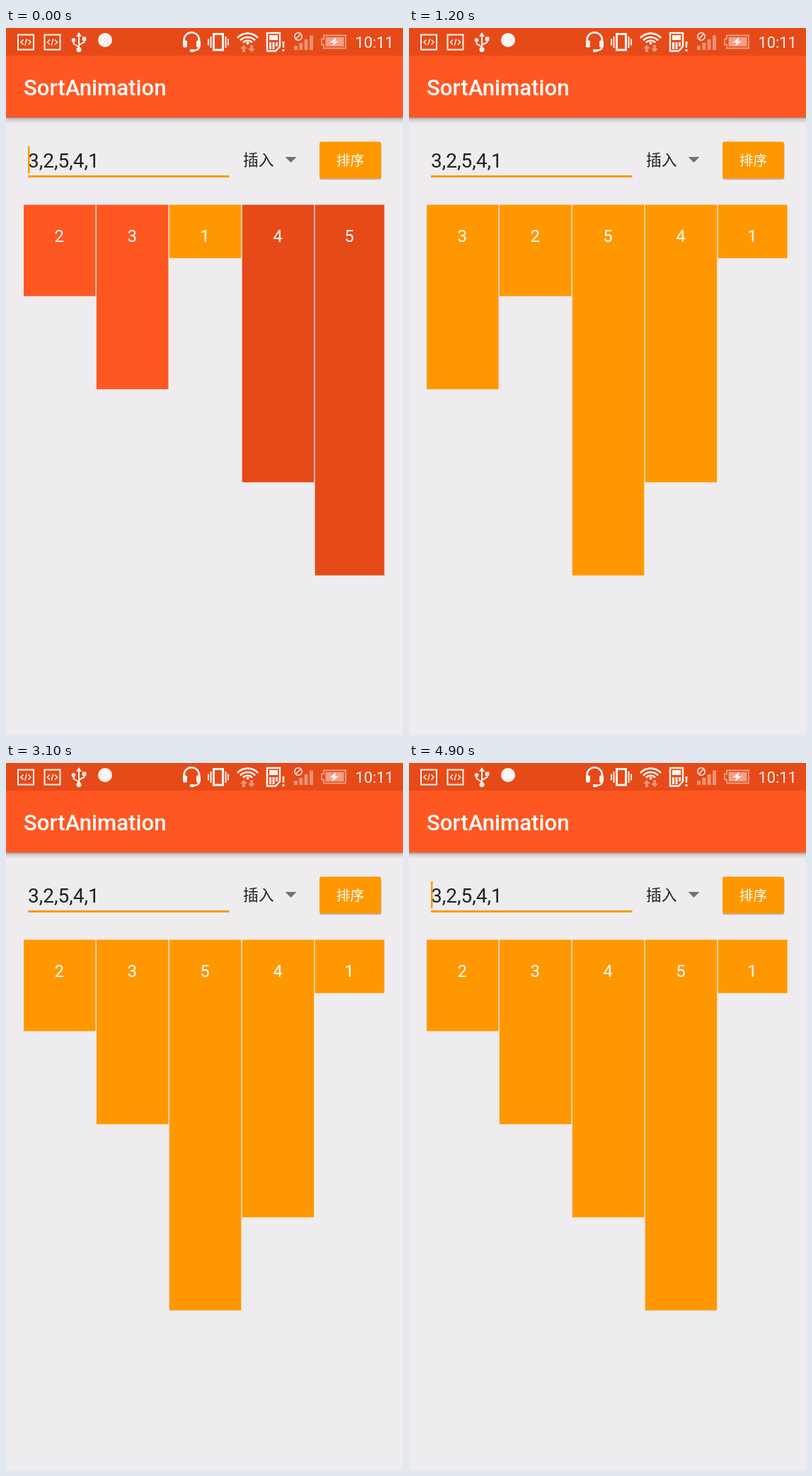
Animation, 561 px wide and 998 px high, one loop 5 s. Source, as an HTML page:

```html
<!DOCTYPE html>
<html lang="zh">
<head>
<meta charset="utf-8">
<title>SortAnimation</title>
<style>
  html, body { margin: 0; width: 100%; height: 100%; overflow: hidden; background: #eeecee; }
  svg { display: block; width: 100vw; height: 100vh; }
  text { font-family: Roboto, "Noto Sans CJK SC", "Noto Sans CJK", sans-serif; }
  .cjk { font-family: "Noto Sans CJK SC", "Noto Sans CJK", sans-serif; }
  .line { fill: none; stroke: #fff; }
  .num { font-size: 24px; fill: #fff; text-anchor: middle; }
</style>
</head>
<body>
<svg viewBox="0 0 561 998">
  <defs>
    <linearGradient id="shade" x1="0" y1="0" x2="0" y2="1">
      <stop offset="0" stop-color="#000" stop-opacity=".34"/>
      <stop offset=".4" stop-color="#000" stop-opacity=".12"/>
      <stop offset="1" stop-color="#000" stop-opacity="0"/>
    </linearGradient>
    <g id="code">
      <rect x="-11" y="-10.5" width="22" height="21" class="line" stroke-width="2"/>
      <path d="M-3.5-3.5 -7 0 -3.5 3.5M3.5-3.5 7 0 3.5 3.5M1.2-4.5 -1.2 4.5" class="line" stroke-width="1.5"/>
    </g>
  </defs>

  <rect width="561" height="998" fill="#eeecee"/>
  <rect y="126" width="561" height="9" fill="url(#shade)"/>
  <rect y="39" width="561" height="87.5" fill="#ff5722"/>
  <rect width="561" height="39" fill="#e64a19"/>

  <!-- status bar -->
  <g fill="#fff" opacity=".95">
    <use href="#code" x="28" y="20"/>
    <use href="#code" x="65.5" y="20"/>
    <g>
      <path d="M103 10V30M103 27 95.500 22V17M103 24 110.500 20V15" class="line" stroke-width="2"/>
      <path d="M103 6 107 12H99Z"/>
      <circle cx="103" cy="30.500" r="3.500"/>
      <circle cx="95.500" cy="17" r="2.800"/>
      <rect x="107.800" y="12.500" width="5.500" height="5.500"/>
    </g>
    <circle cx="140" cy="17" r="10"/>
    <g>
      <path d="M251.500 20V17A10.700 10.700 0 0 1 273 17V26Q273 32 263 32" class="line" stroke-width="2.600"/>
      <rect x="250" y="17.500" width="6" height="10" rx="2"/>
      <rect x="269" y="17.500" width="6" height="10" rx="2"/>
      <rect x="260" y="30" width="6" height="4" rx="1"/>
    </g>
    <path d="M293.500 8.500H306.500V31H293.500Z" class="line" stroke-width="3"/>
    <path d="M289.500 12V28M310.500 12V28M286 15.500V24.500M314 15.500V24.500" class="line" stroke-width="2"/>
    <path d="M327 14A20 20 0 0 1 356 14M331 17.500A14.500 14.500 0 0 1 352 17.500M335 20.500A9 9 0 0 1 348 20.500" class="line" stroke-width="2.600"/>
    <path d="M327.500 13A20 20 0 0 1 355.500 13" class="line" stroke-width="2"/>
    <circle cx="341.500" cy="21.500" r="2"/>
    <path d="M336 24 341 29H338V34H334V29H331ZM347 34 342 29H345V24H349V29H352Z" opacity=".45"/>
    <path d="M369 7H387V26L381 32.500H369Z" class="line" stroke-width="2.400"/>
    <path d="M372 10H384V17H372ZM372 20H375V30H372ZM376.500 20H379.500V30H376.500ZM381 20H384V26H381Z"/>
    <path d="M390.500 19H393.500L393 28H391ZM390.500 30H393.500V33H390.500Z"/>
    <path d="M407 25H412V31H407ZM414.300 21H419.300V31H414.300ZM421.600 16H426.600V31H421.600ZM429 10.500H434V31H429Z" opacity=".42"/>
    <circle cx="413" cy="12" r="5.200" class="line" stroke-width="1.500"/>
    <path d="M409.500 15.500 416.500 8.500" class="line" stroke-width="1.500"/>
    <g opacity=".5">
      <path d="M449 10.500H480V28.500H449V23.500H446V15.500H449Z" class="line" stroke-width="1.800"/>
      <rect x="451.500" y="13" width="26" height="13"/>
    </g>
    <path d="M466.500 13 457.500 20.500H463L460.500 26 470.500 18.500H465Z"/>
    <text x="493.500" y="28" font-size="21.800">10:11</text>
  </g>

  <text x="25" y="94.500" font-size="31.200" font-weight="500" fill="#fff">SortAnimation</text>

  <!-- input row -->
  <text x="31" y="197" font-size="28" fill="#212021">3,2,5,4,1</text>
  <rect x="31" y="208" width="284.500" height="3" fill="#ff9800"/>
  <rect id="cursor" x="31" y="167" width="2.500" height="38" fill="#ff9800"/>
  <text class="cjk" x="335" y="194.200" font-size="21.800" fill="#212021">插入</text>
  <path d="M394.500 182H410.500L402.500 190Z" fill="#737173"/>
  <rect x="443" y="162" width="87.500" height="52.200" rx="3.500" fill="#000" opacity=".22"/>
  <rect x="443" y="160.500" width="87" height="52" rx="3" fill="#ff9800"/>
  <text class="cjk" x="486.500" y="194.300" font-size="19.800" font-weight="500" fill="#fff" text-anchor="middle">排序</text>

  <g id="chart"></g>
</svg>
<script>
const NS = "http://www.w3.org/2000/svg";
const LOOP = 5000, STEP = 100, FADE = 120, MOVE = 250;
const CLEAR_OUT = 625, FILL_IN = CLEAR_OUT + FADE;
const PLAIN = "#ff9800", LIT = "#ff5722", DONE = "#e64a19";

const SWAPS = [
  { at: 1664, until: 2725, order: [2, 3, 5, 4, 1], rising: 2, lit: [3, 5] },
  { at: 3790, until: 4850, order: [2, 3, 4, 5, 1], rising: 4, lit: [3, 4] }
];

const chart = document.getElementById("chart");
const cursor = document.getElementById("cursor");

function add(parent, tag, attrs) {
  const el = document.createElementNS(NS, tag);
  for (const key in attrs) el.setAttribute(key, attrs[key]);
  return parent.appendChild(el);
}

// Bars that move left lie below those that move right.
const bars = [2, 4, 1, 3, 5].map(value => {
  const group = add(chart, "g", {});
  const height = Math.max(75.3, 131.4 * value - 133.800);
  const rect = add(group, "rect", { y: 249.500, height });
  const label = add(group, "text", { y: 302, class: "num" });
  label.textContent = value;
  return { value, group, rect, label };
});

const slotX = slot => 25 + 102.900 * slot;
const ease = f => 0.5 - Math.cos(Math.PI * Math.min(1, Math.max(0, f))) / 2;

function sceneAt(t) {
  if (t < FILL_IN) {
    const order = [2, 3, 1, 4, 5];
    return { from: order, order, move: 1, lit: [2, 3], done: [4, 5],
             alpha: 1 - ease((t - CLEAR_OUT) / FADE) };
  }
  const start = [3, 2, 5, 4, 1];
  const scene = { from: start, order: start, move: 1, lit: [], done: [],
                  alpha: ease((t - FILL_IN) / FADE) };
  for (const swap of SWAPS) {
    if (t < swap.at) break;
    scene.from = scene.order;
    scene.order = swap.order;
    scene.rising = swap.rising;
    scene.move = ease((t - swap.at) / MOVE);
    scene.lit = t < swap.until ? swap.lit : [];
  }
  return scene;
}

function draw(t) {
  const s = sceneAt(t);
  for (const { value, group, rect, label } of bars) {
    const a = s.from.indexOf(value), b = s.order.indexOf(value);
    const x = slotX(a) + (slotX(b) - slotX(a)) * s.move;
    const width = b === 4 ? 98 : 101.500;
    const alpha = value === s.rising ? s.move ** 2.3 : s.alpha;
    group.setAttribute("transform", `translate(${x} 0)`);
    group.setAttribute("opacity", alpha);
    rect.setAttribute("width", width);
    rect.setAttribute("fill", s.done.includes(value) ? DONE : s.lit.includes(value) ? LIT : PLAIN);
    label.setAttribute("x", width / 2 - 0.500);
  }
  const blink = t % 1000;
  cursor.setAttribute("opacity", blink < 50 || blink > 550 ? 1 : 0);
}

const origin = performance.now();
function tick() {
  const t = (performance.now() - origin) % LOOP;
  draw(Math.floor(t / STEP) * STEP);
  requestAnimationFrame(tick);
}
tick();
</script>
</body>
</html>
```
